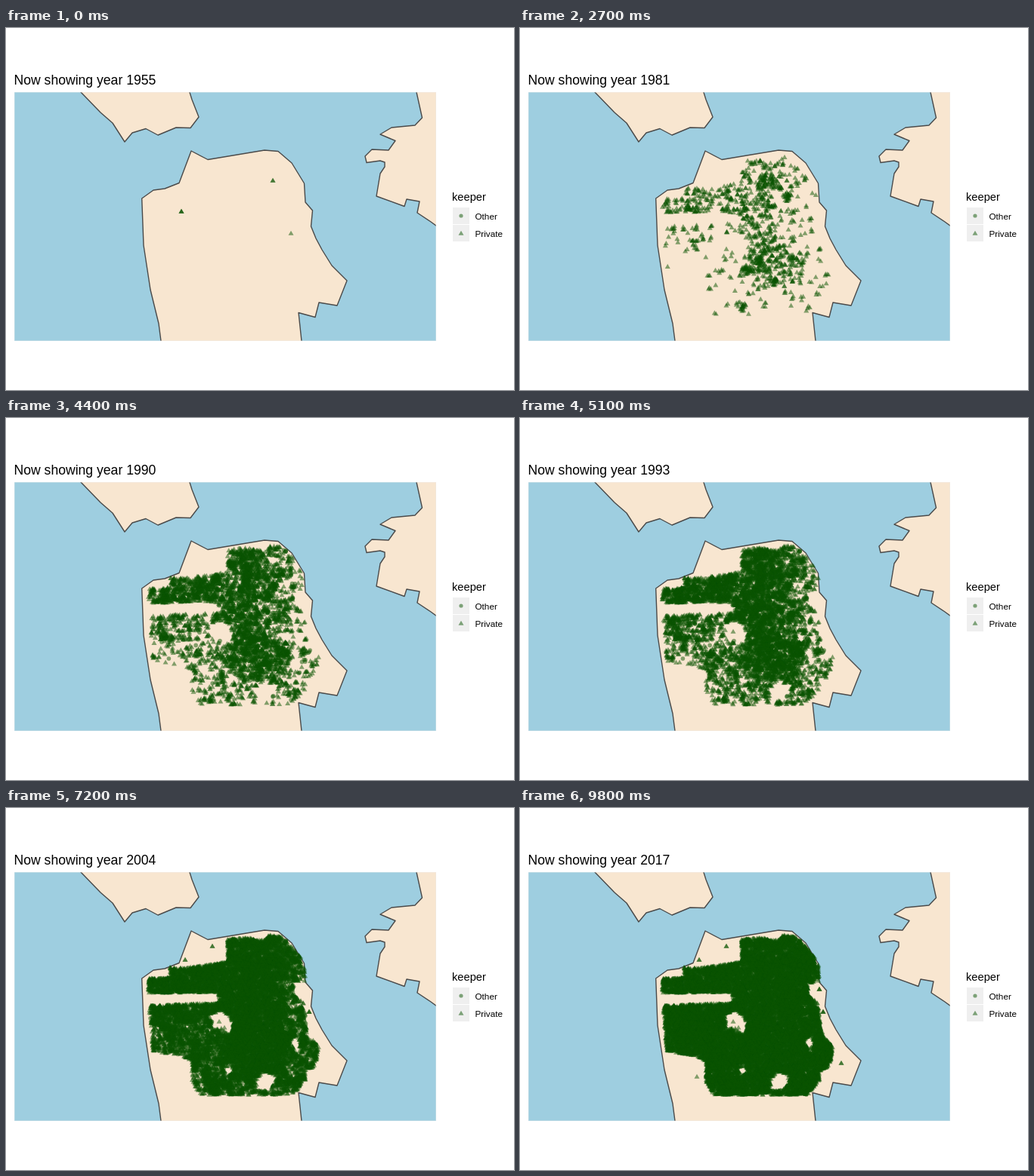
Recreate the animation shown at these times as an HTML page with a canvas. Size 672 by 480 pixels, loop 10000 ms.

```html
<!DOCTYPE html>
<html lang="en">
<head>
<meta charset="utf-8">
<title>Trees by year</title>
<style>
  html, body { margin: 0; width: 100%; height: 100%; overflow: hidden; background: #fff; }
  svg, canvas { position: absolute; left: 0; top: 0; width: 672px; height: 480px; }
  text { font-family: "Liberation Sans", Arial, sans-serif; fill: #000; }
  .land { fill: #f8e6d0; stroke: #4a4a4a; stroke-width: 1.4; stroke-linejoin: round; }
  .mark { fill: #0a5300; fill-opacity: .5; }
</style>
</head>
<body>
<svg viewBox="0 0 672 480">
  <clipPath id="panel"><rect x="11" y="85" width="558" height="330"/></clipPath>
  <g clip-path="url(#panel)">
    <rect x="11" y="85" width="558" height="330" fill="#9ecee0"/>
    <path class="land" d="M94 79L99 85L125 112L141 126L157 151L167 139L185 133.5L201 142L225 132L244 132.5L255 118L246 95L241 79Z"/>
    <path class="land" d="M206 421L205 415L202 392L191 347L182 288L179.7 226L195 215L210 213L229 205.5L245 163L267 174.5L342 162L360 163.5L378 179L394.5 206L396 231L405.5 242L403.5 263L410 279L418 294L431 315L451 335L438 368L414 364L409 383.5L387 377.5L391 415L392 421Z"/>
    <path class="land" d="M541.5 79L543 85L550.5 119L541 129L510 132L495 141L515 149.5L506 162L484 161L475 170L477 178.5L495 176L501 178L501 184L495 193L490 223L527 236.5L530 227L547 230L544 245L562 257L580 270V79Z"/>
    <rect x="11" y="85" width="558" height="330" fill="none" stroke="#ebebeb" stroke-width="1" stroke-opacity=".7"/>
  </g>
  <text id="title" x="10.5" y="75" font-size="17.6">Now showing year 1955</text>
  <text x="590" y="229" font-size="14.67">keeper</text>
  <rect x="591" y="238" width="22" height="22" fill="#efefef"/>
  <rect x="591" y="261" width="22" height="22" fill="#efefef"/>
  <circle class="mark" cx="602" cy="249" r="2.6"/>
  <path class="mark" d="M602 268.7L605.5 274.8H598.5Z"/>
  <text x="620.5" y="254" font-size="11.73">Other</text>
  <text x="620.5" y="277" font-size="11.73">Private</text>
</svg>
<canvas id="trees" width="672" height="480"></canvas>
<script>
const LOOP = 10000, STEP = 100, LAST = 98, SITES = 14500;
const ctx = document.getElementById('trees').getContext('2d');
const title = document.getElementById('title');

// Planted area, with the parks and hills left open.
const planted = new Path2D(
  'M188 226L217 224V211L232 212L272 207L293 203V174L320 172L337 175L348 168L366 171L380 185L390 198L395 208L396 229' +
  'L381 233V247L393 257L396 270L398 290L402 304L414 315L411 335L407 343L397 348L396 361L380 380H255L246 361V335L230 328L194 322' +
  'L189 262L281 258V244L188 245Z' +
  'M273 272L286 268L297 277L301 290L295 300L285 292L272 292Z' +
  'M288 345L298 342L300 351L293 355Z' +
  'M333 357L341 349L354 353L356 364L347 374L331 374Z' +
  'M376 307L385 301L390 313L381 319Z');

// Planting starts along these streets and spreads outwards.
const spine = [[[200, 235], [290, 225]], [[325, 178], [312, 250]], [[312, 250], [332, 320]]];
const firstTrees = [[232, 243], [353, 202], [377, 272]];
// Lone trees outside the area, in the order they appear.
const strays = [[282, 283], [273, 183], [401, 270], [289, 291], [237, 201], [396, 240], [234, 356], [425, 338]];

let seed = 20755;
function rnd() {
  seed = (seed + 0x6d2b79f5) | 0;
  let v = Math.imul(seed ^ (seed >>> 15), 1 | seed);
  v = (v + Math.imul(v ^ (v >>> 7), 61 | v)) ^ v;
  return ((v ^ (v >>> 14)) >>> 0) / 4294967296;
}
const bell = sd => (rnd() + rnd() + rnd() - 1.5) * 2 * sd;
const clamp = v => Math.max(0, Math.min(1, v));

function distance(x, y, [[ax, ay], [bx, by]]) {
  const dx = bx - ax, dy = by - ay;
  const k = clamp(((x - ax) * dx + (y - ay) * dy) / (dx * dx + dy * dy));
  return Math.hypot(x - ax - k * dx, y - ay - k * dy);
}

// 0 beside the spine, 1 in the outskirts.
function remoteness(x, y) {
  return clamp((Math.min(...spine.map(s => distance(x, y, s))) - 10) / 48);
}

const trees = [];
const isPlanted = (x, y) => ctx.isPointInPath(planted, x, y, 'evenodd');

function addSite() {
  const x = 186 + rnd() * 228, y = 168 + rnd() * 213;
  if (!isPlanted(x, y)) return;
  const far = remoteness(x, y);
  // Outskirts fill later and more abruptly.
  const born = 2 + (60 + 28 * far) * rnd() ** (1 / (2.3 + 1.1 * far));
  const grove = rnd() < 0.04;
  const size = grove ? 8 + rnd() * 14 : 1 + Math.floor(rnd() ** 2 * 4);
  const round = born > 36 && rnd() < 0.14;
  for (let i = 0; i < size; i++) {
    const tx = x + bell(grove ? 2.6 : 1.4), ty = y + bell(grove ? 2.6 : 1.4);
    if (isPlanted(tx, ty)) trees.push({ x: tx, y: ty, born: born + i * 0.2, round });
  }
}

function addStack([x, y], born, count) {
  for (let i = 0; i < count; i++) trees.push({ x, y, born, round: false });
}

for (let i = 0; i < SITES; i++) addSite();
firstTrees.forEach((p, i) => addStack(p, 0, 3 - i));
strays.forEach((p, i) => addStack(p, 46 + 6 * i, 1 + i % 3));
trees.sort((a, b) => a.born - b.born);

function drawTree({ x, y, round }) {
  ctx.beginPath();
  if (round) {
    ctx.arc(x, y, 2.8, 0, 7);
  } else {
    ctx.moveTo(x, y - 3.3);
    ctx.lineTo(x + 3.5, y + 2.8);
    ctx.lineTo(x - 3.5, y + 2.8);
  }
  ctx.fill();
}

ctx.fillStyle = 'rgba(10, 83, 0, .5)';
let shown = -1, drawn = 0;
function show(step) {
  if (step === shown) return;
  if (step < shown) {
    ctx.clearRect(0, 0, 672, 480);
    drawn = 0;
  }
  while (drawn < trees.length && trees[drawn].born <= step) drawTree(trees[drawn++]);
  const year = step < 2 ? 1955 : 1968 + Math.floor(step / 2);
  title.textContent = 'Now showing year ' + year;
  shown = step;
}

const start = performance.now();
function tick() {
  const t = (performance.now() - start) % LOOP;
  show(Math.min(LAST, Math.floor(t / STEP)));
  requestAnimationFrame(tick);
}
tick();
</script>
</body>
</html>
```
